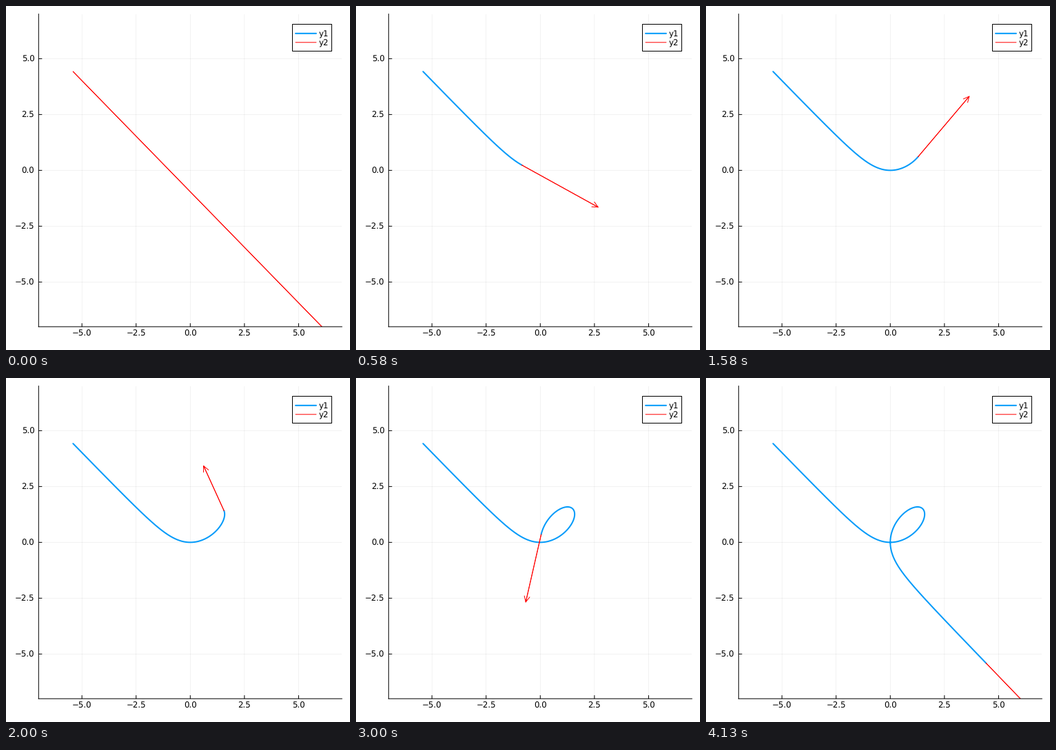
Recreate the animation shown at these times as a matplotlib script. Size 499 by 499 pixels, loop 4.18 s.

```python
import numpy as np
import matplotlib.pyplot as plt
from matplotlib.animation import FuncAnimation
from matplotlib.patches import Rectangle

SIZE, DPI = 499, 100
PX = 72 / DPI                       # one pixel in points
LEFT, TOP, WIDTH, HEIGHT = 47.3, 11.6, 440, 453.6
LIM = 7
UNIT = np.array([WIDTH, HEIGHT]) / (2 * LIM)    # pixels per data unit

BLUE, RED = "#009afa", "#ff0000"
LOOP_MS, TICK_MS, POSES = 4180, 20, 100
HEAD_LEN, HEAD_HALF = 8.2, 4.0

plt.rcParams.update({
    "font.family": "DejaVu Sans",
    "text.hinting": "none",
    "path.snap": False,
    "lines.solid_capstyle": "round",
})
FONT = 11.8 * PX


def folium(theta):
    """Folium of Descartes by polar angle: position and velocity."""
    t = np.tan(theta)
    d = 1 + t**3
    pos = np.stack([3 * t / d, 3 * t**2 / d], axis=-1)
    vel = np.stack([3 * (1 - 2 * t**3), 3 * t * (2 - t**3)], axis=-1)
    return pos, vel * ((1 + t**2) / d**2)[:, None]


def arrow(start, vec):
    """Shaft and open head as one polyline with a gap."""
    tip = start + vec
    u = vec * UNIT
    u = u / np.hypot(*u)
    side = np.array([-u[1], u[0]]) * HEAD_HALF
    back = -u * HEAD_LEN
    gap = [np.nan, np.nan]
    return np.array([start, tip, gap,
                     tip + (back + side) / UNIT, tip,
                     tip + (back - side) / UNIT])


theta = np.linspace(-np.pi / 4 + 0.1, 3 * np.pi / 4 - 0.1, POSES)
pos, vel = folium(theta)

fig = plt.figure(figsize=(SIZE / DPI, SIZE / DPI), dpi=DPI, facecolor="white")
ax = fig.add_axes([LEFT / SIZE, 1 - (TOP + HEIGHT) / SIZE,
                   WIDTH / SIZE, HEIGHT / SIZE])
ax.set(xlim=(-LIM, LIM), ylim=(-LIM, LIM))
ticks = np.arange(-5, 5.1, 2.5)
labels = [f"{v:.1f}".replace("-", "\u2212") for v in ticks]
ax.set_xticks(ticks, labels)
ax.set_yticks(ticks, labels)
ax.tick_params(length=0, labelsize=FONT)
ax.tick_params(axis="x", pad=4.5 * PX)
ax.tick_params(axis="y", pad=6 * PX)
ax.grid(color="black", alpha=0.1, lw=0.5 * PX)
ax.set_axisbelow(True)
ax.spines[["top", "right"]].set_visible(False)
ax.spines[["left", "bottom"]].set_linewidth(PX)

curve, = ax.plot([], [], color=BLUE, lw=2 * PX, solid_joinstyle="round")
# The shaft is stroked twice, which firms up its thin line
shaft, = ax.plot([], [], color=RED, lw=PX)
pointer, = ax.plot([], [], color=RED, lw=PX)

# Tick marks and legend, laid out in pixels
overlay = fig.add_axes([0, 0, 1, 1])
overlay.set(xlim=(0, SIZE), ylim=(SIZE, 0))
overlay.axis("off")


def stroke(x, y, color="black", lw=1, **style):
    overlay.plot(x, y, color=color, lw=lw * PX, **style)


bottom = TOP + HEIGHT
for v in ticks:
    x = LEFT + (v + LIM) * UNIT[0]
    y = bottom - (v + LIM) * UNIT[1]
    stroke([x, x], [bottom - 5, bottom], solid_capstyle="butt")
    stroke([LEFT, LEFT + 5], [y, y], solid_capstyle="butt")

overlay.add_patch(Rectangle((415.5, 26.5), 57, 39,
                            fc="white", ec="black", lw=PX))
for name, color, lw, y in (("y1", BLUE, 2, 39.8), ("y2", RED, 1, 52.8)):
    stroke([420, 450], [y, y], color, lw)
    overlay.text(454, y + 4.2, name, fontsize=FONT, va="baseline")


def draw(i):
    ms = TICK_MS * i + TICK_MS // 2
    k = min((ms + 5) * 24 // 1000, POSES - 1)   # 24 poses per second
    points = arrow(pos[k], vel[k])
    curve.set_data(*pos[:k + 1].T)
    shaft.set_data(*points[:2].T)
    pointer.set_data(*points.T)
    return curve, shaft, pointer


anim = FuncAnimation(fig, draw, frames=LOOP_MS // TICK_MS, interval=TICK_MS,
                     repeat=True, repeat_delay=0)
plt.show()
```
